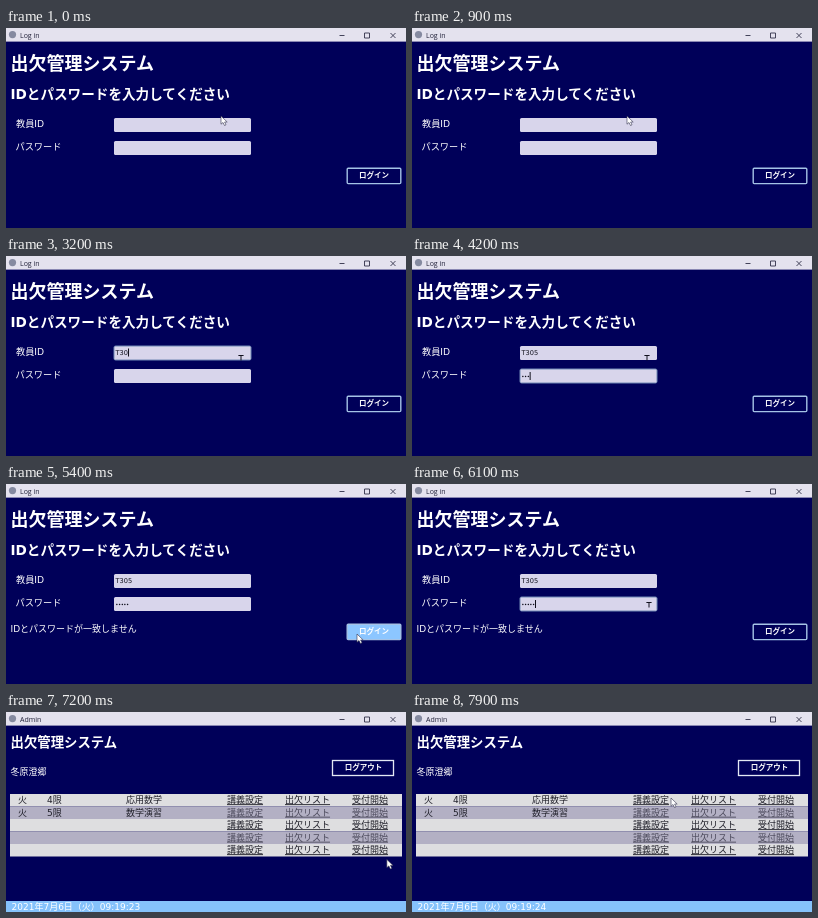
An HTML page that plays this animation: 400x200 px, repeating every 8000 ms.

```html
<!DOCTYPE html>
<html lang="ja">
<head>
<meta charset="utf-8">
<title>Log in</title>
<style>
  html, body { margin: 0; width: 100%; height: 100%; overflow: hidden; background: #000059; }
  svg { display: block; width: 400px; height: 200px; }
  text { font: 9px "DejaVu Sans", "Noto Sans CJK JP", "Noto Sans CJK", sans-serif; fill: #fff; white-space: pre; }
  .title { font: 7px "Open Sans", sans-serif; fill: #22223a; }
  .h1 { font-size: 18px; font-weight: bold; }
  .h2 { font-size: 13.6px; font-weight: bold; }
  .h3 { font-size: 13.4px; font-weight: bold; }
  .label { font-size: 9.2px; }
  .btn { font-size: 7.5px; font-weight: bold; text-anchor: middle; }
  .field { fill: #d8d5eb; }
  .field.focus { stroke: #7189b5; stroke-width: 1; }
  .value { font-size: 6.6px; fill: #10101c; }
  .dots { font-size: 4.2px; font-weight: bold; }
  .cell { fill: #20202a; }
  .dim { fill: #4c4a5c; }
  .link { text-decoration: underline; text-decoration-thickness: .7px; }
</style>
</head>
<body>
<svg viewBox="0 0 400 200">
  <rect width="400" height="200" fill="#000059"/>

  <g id="login">
    <text class="h1" x="4.5" y="42.2">出欠管理システム</text>
    <text class="h2" x="4.5" y="71">IDとパスワードを入力してください</text>
    <text class="label" x="10" y="98.8">教員ID</text>
    <text class="label" x="9.5" y="122.3">パスワード</text>
    <rect id="idBox" class="field" x="108" y="90" width="137" height="14" rx="1.5"/>
    <rect id="passBox" class="field" x="108" y="113" width="137" height="14" rx="1.5"/>
    <text id="idText" class="value" x="109.6" y="99"></text>
    <text id="passText" class="value dots" x="109.6" y="121.6"></text>
    <rect id="caret" width="1" height="8" fill="#10101c"/>
    <text id="error" x="4.5" y="148.3">IDとパスワードが一致しません</text>
    <rect id="button" x="341.2" y="140.2" width="53.6" height="15.4" rx="1" stroke="#a5c3e6" stroke-width="1.4"/>
    <text class="btn" x="368" y="150.4">ログイン</text>
  </g>

  <g id="admin">
    <text class="h3" x="4.5" y="34.6">出欠管理システム</text>
    <text x="4.5" y="63">冬原澄郷</text>
    <rect x="326.5" y="48.5" width="61" height="15" fill="none" stroke="#e4e9f4" stroke-width="1.3"/>
    <text class="btn" x="357.5" y="58.4">ログアウト</text>
    <g id="rows"></g>
    <rect y="189" width="400" height="11" fill="#85c2fb"/>
    <text id="clock" x="5.5" y="198"></text>
  </g>

  <rect width="400" height="13.6" fill="#e4e2ee"/>
  <circle cx="6.5" cy="6.6" r="3.6" fill="#858aa0"/>
  <text id="title" class="title" x="14" y="9.8"></text>
  <path d="M333.5 7.5h5M358.5 5h5v5h-5zM384.5 5l5 5m0-5l-5 5" fill="none" stroke="#33334a" stroke-width=".9"/>

  <path id="arrow" d="M0 0V8.2L2 6.5L3.5 9.5L5 8.8L3.6 6H6.2Z" fill="#fff" stroke="#33334d" stroke-width=".6"/>
  <path id="beam" d="M-2.6 -1.5H2.6M0 -1.5V3.5" fill="none" stroke="#10101c" stroke-width="1"/>
</svg>

<script>
const LOOP = 8000, STEP = 100, ADMIN_AT = 7000;
const $ = id => document.getElementById(id);
const show = (id, on) => { $(id).style.display = on ? '' : 'none'; };

// Pointer path: time, x, y
const path = [
  [0, 215, 88], [900, 215, 88], [1800, 239, 101], [2200, 239, 101],
  [2600, 235, 101], [4500, 235, 101], [5000, 351, 150], [5500, 351, 150],
  [5900, 237, 120], [6300, 237, 120], [6700, 388, 151], [7100, 388, 151],
  [7800, 259, 86], [8000, 259, 86]
];

// Each entry holds from its time onward
const idKeys = [[0, ''], [2700, 'T'], [2900, 'T3'], [3100, 'T30'], [3400, 'T305']];
const passKeys = [[0, 0], [3900, 1], [4000, 2], [4200, 3], [4300, 4], [4500, 5], [6200, 4]];
const focusKeys = [[0, ''], [2200, 'id'], [3700, 'pass'], [5100, ''], [5900, 'pass'], [6800, '']];
const pressKeys = [[0, false], [5100, true], [5200, false], [6800, true]];

const at = (keys, t) => keys.filter(k => k[0] <= t).pop()[1];
const inside = ([x, y], l, t, r, b) => x >= l && x <= r && y >= t && y <= b;

function pointer(t) {
  const i = path.findIndex(k => k[0] > t);
  const [t0, x0, y0] = path[i - 1], [t1, x1, y1] = path[i];
  const p = (t - t0) / (t1 - t0), e = p * p * (3 - 2 * p);
  return [x0 + (x1 - x0) * e, y0 + (y1 - y0) * e];
}

function buildRows() {
  const lessons = [['火', '4限', '応用数学'], ['火', '5限', '数学演習']];
  const links = ['講義設定', '出欠リスト', '受付開始'];
  const columns = [12, 41, 120, 221, 279, 346];
  let html = '';
  for (let r = 0; r < 5; r++) {
    const y = 82 + r * 12.5, odd = r % 2;
    html += `<rect x="4" y="${y}" width="392" height="12.5" fill="${odd ? '#b3b0c4' : '#dedee0'}"/>`;
    [...(lessons[r] || ['', '', '']), ...links].forEach((s, c) => {
      const style = c > 2 ? ' link' + (odd ? ' dim' : '') : '';
      html += `<text class="cell${style}" x="${columns[c]}" y="${y + 9.2}">${s}</text>`;
    });
  }
  $('rows').innerHTML = html;
}

function drawLogin(t, pos) {
  const focus = at(focusKeys, t);
  $('idText').textContent = at(idKeys, t);
  $('passText').textContent = '•'.repeat(at(passKeys, t));
  for (const name of ['id', 'pass']) $(name + 'Box').classList.toggle('focus', focus === name);
  show('caret', focus);
  if (focus) {
    const text = $(focus + 'Text');
    $('caret').setAttribute('x', 109.6 + (text.textContent ? text.getComputedTextLength() : 0));
    $('caret').setAttribute('y', focus === 'id' ? 92.5 : 116);
  }
  show('error', t >= 5200);
  const hover = inside(pos, 341, 140, 395, 156);
  $('button').setAttribute('fill', !hover ? '#000059' : at(pressKeys, t) ? '#6f9fdf' : '#8cc6ff');
}

function draw(t) {
  const admin = t >= ADMIN_AT, pos = pointer(t);
  show('login', !admin);
  show('admin', admin);
  $('title').textContent = admin ? 'Admin' : 'Log in';
  if (admin) $('clock').textContent = `2021年7月6日（火）09:19:${t < 7300 ? 23 : 24}`;
  else drawLogin(t, pos);

  const typing = !admin && (inside(pos, 108, 90, 245, 104) || inside(pos, 108, 113, 245, 127));
  show('arrow', !typing);
  show('beam', typing);
  $(typing ? 'beam' : 'arrow').setAttribute('transform', `translate(${pos})`);
}

buildRows();
const start = performance.now();
function tick() {
  const t = (performance.now() - start) % LOOP;
  draw(Math.floor(t / STEP) * STEP);
  requestAnimationFrame(tick);
}
tick();
</script>
</body>
</html>
```
